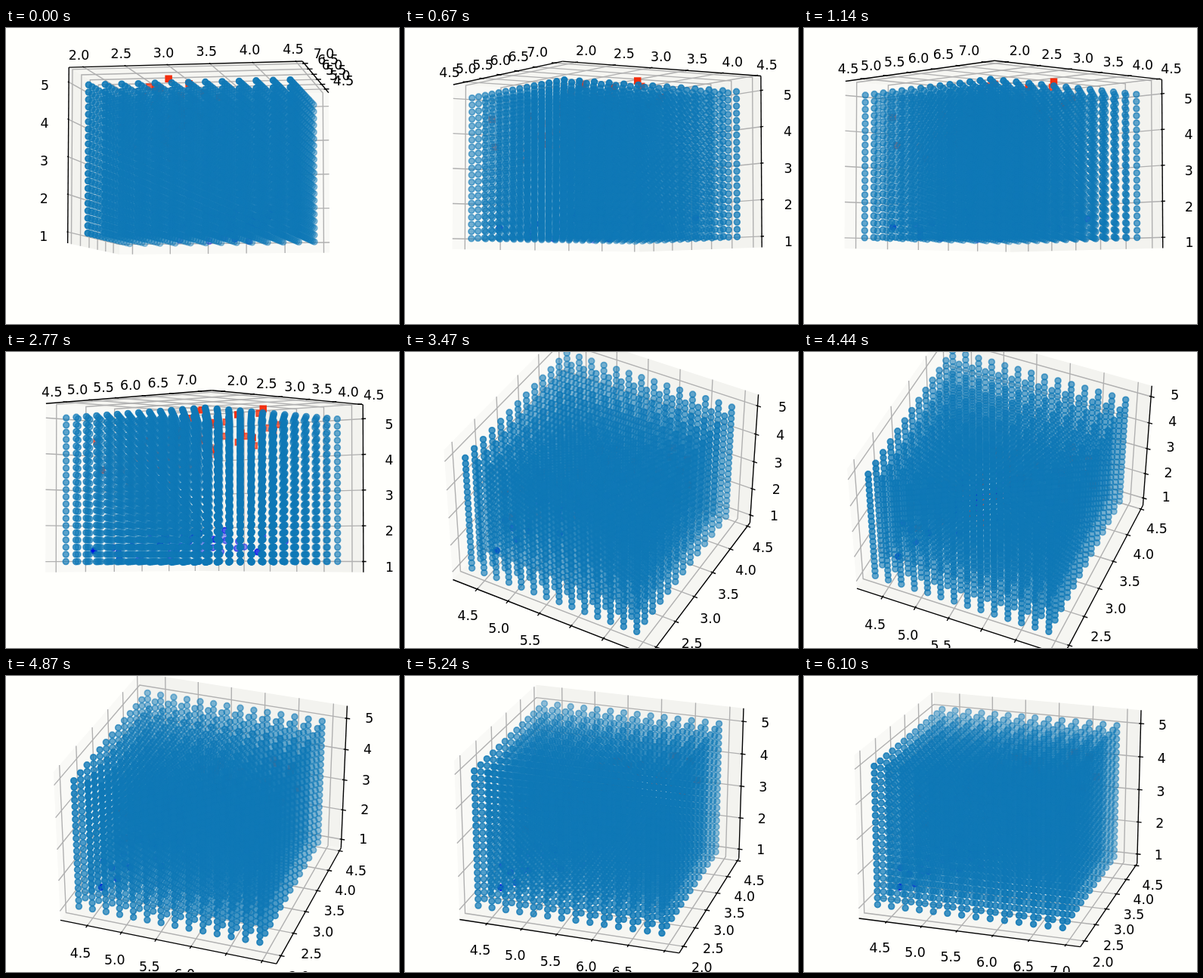
Recreate the animation shown at these times as an HTML page with a canvas. Size 520 px wide and 392 px high, loop 6.13 s.

```html
<!DOCTYPE html>
<html lang="en">
<head>
<meta charset="utf-8">
<title>Rotating 3D scatter</title>
<style>
html, body { margin: 0; width: 100%; height: 100%; overflow: hidden; background: #fffffc; }
canvas { display: block; }
</style>
</head>
<body>
<canvas id="stage" width="520" height="392"></canvas>
<script>
const ctx = document.getElementById('stage').getContext('2d');
const LOOP = 6130;

// View: screen centre, pixel scale, eye distance, box proportions
const CX = 263.3, CY = 180.2, SCALE = 2497, DIST = 10;
const BOX = [1.1429, 1.1429, 0.8571];
const EDGE = 0.5 + 1 / 48;
const LABEL = EDGE + 0.0864;
const PT = 125 / 72;
const PANES = ['#f9f9f6', '#f3f3ef', '#f6f6f2'];

const LIMITS = [[4.165, 7.135], [1.88, 4.52], [0.795, 5.305]];
const range = (a, step, n) => Array.from({ length: n }, (_, i) => a + i * step);
const TICKS = [range(4.5, 0.5, 6), range(2, 0.5, 6), range(1, 1, 5)];

const unit = (v, i) => (v - LIMITS[i][0]) / (LIMITS[i][1] - LIMITS[i][0]) - 0.5;
const toUnit = p => p.map(unit);

const lattice = [];
for (const x of range(4.3, 0.2, 14))
  for (const y of range(2, 0.2, 13))
    for (const z of range(1, 0.2, 21)) lattice.push(toUnit([x, y, z]));

let seed = 7;
function random() {
  seed = (seed * 16807) % 2147483647;
  return seed / 2147483647;
}
const noise = sd => (random() + random() + random() + random() - 2) * 1.73 * sd;
const inData = u => Math.max(-0.4545, Math.min(0.4545, u));

// Cloud around a mean; y and z follow x by the given slopes
function cloud([x, y, z], spread, slopeY, slopeZ) {
  return Array.from({ length: 48 }, () => {
    const dx = noise(spread[0]);
    const p = [x + dx, y + slopeY * dx + noise(spread[1]), z + slopeZ * dx + noise(spread[2])];
    return toUnit(p).map(inData);
  });
}
const dots = cloud([5, 3.43, 1.46], [0.35, 0.26, 0.17], 0.8, 0.13);
dots.push(toUnit([4.5, 2.3, 1.3]), toUnit([4.6, 3.6, 1]));
const squares = cloud([5.95, 2.8, 4.3], [0.5, 0.27, 0.3], 0.32, 0.69);
squares.push(toUnit([5, 2, 3.5]), toUnit([6, 2.7, 5.1]));

// Drag bursts: start, end, elevation and azimuth reached
const BURSTS = [
  [0, 0, -5.5, 10], [40, 100, -5.2, 8], [270, 670, -4, -31.1], [700, 870, -4, -37],
  [900, 1140, -4, -42.2], [2770, 2770, -2, -47.3], [2870, 2940, -1.2, -50],
  [3440, 3470, 40, -61], [3670, 3900, 55, -64], [4000, 4240, 50, -65.5],
  [4300, 4870, 30.5, -70.5], [4970, 5340, 20.5, -72.2], [6040, 6100, 20, -72.4]
];

function poseAt(t) {
  let pose = BURSTS[0].slice(2);
  for (const [a, b, ...goal] of BURSTS) {
    if (t < a) break;
    const gaps = Math.ceil((b - a) / 43);
    const step = t >= b ? gaps : Math.floor((t - a) / (b - a) * gaps);
    const f = (step + 1) / (gaps + 1);
    pose = pose.map((v, i) => v + (goal[i] - v) * f);
  }
  return pose;
}

function camera(elev, azim) {
  const e = elev * Math.PI / 180, a = azim * Math.PI / 180;
  const se = Math.sin(e), ce = Math.cos(e), sa = Math.sin(a), ca = Math.cos(a);
  const project = u => {
    const [x, y, z] = u.map((v, i) => v * BOX[i]);
    const out = x * ca + y * sa;
    const depth = DIST - out * ce - z * se;
    const k = SCALE / depth;
    return [CX + (y * ca - x * sa) * k, CY - (z * ce - out * se) * k, depth];
  };
  const far = [ca, sa, se].map(v => v > 0 ? -EDGE : EDGE);
  return { project, far };
}

function trace(points) {
  ctx.beginPath();
  for (const p of points) ctx.lineTo(p[0], p[1]);
}

const withAt = (p, i, v) => { const q = p.slice(); q[i] = v; return q; };

function drawPane(i, { project, far }) {
  const j = (i + 1) % 3, k = (i + 2) % 3;
  const flipJ = withAt(far, j, -far[j]);
  ctx.fillStyle = PANES[i];
  trace([far, flipJ, withAt(flipJ, k, -far[k]), withAt(far, k, -far[k])].map(project));
  ctx.fill();
}

function drawAxis(i, { project, far }) {
  const j = (i + 1) % 3, k = (i + 2) % 3;
  const side = i === 0 ? 1 : 0;
  const edge = withAt(far, side, -far[side]);
  const sign = Math.sign(edge[side]);
  ctx.lineWidth = 0.8 * PT;

  ctx.strokeStyle = '#b0b0b0';
  for (const v of TICKS[i]) {
    const p = withAt(far, i, unit(v, i));
    trace([withAt(p, j, -far[j]), p, withAt(p, k, -far[k])].map(project));
    ctx.stroke();
  }

  ctx.strokeStyle = ctx.fillStyle = '#000';
  trace([edge, withAt(edge, i, -edge[i])].map(project));
  ctx.stroke();
  for (const v of TICKS[i]) {
    const p = withAt(edge, i, unit(v, i));
    trace([0.2, -0.1].map(d => project(withAt(p, side, p[side] + sign * d / 12))));
    ctx.stroke();
    const at = project(p.map((c, n) => n === i ? c : Math.sign(c) * LABEL));
    ctx.fillText(i === 2 ? String(v) : v.toFixed(1), at[0], at[1] + 13.2);
  }
}

// Markers fade with depth; fill and outline overlap like separate layers
function drawMarkers(points, color, square, { project }) {
  const placed = points.map(project);
  const depths = placed.map(p => p[2]);
  const near = Math.min(...depths), away = Math.max(...depths);
  const r = Math.sqrt(20) * PT / 2;
  ctx.fillStyle = ctx.strokeStyle = color;
  ctx.lineWidth = PT;
  for (const [x, y, d] of placed) {
    ctx.globalAlpha = 1 - 0.7 * (d - near) / (away - near);
    ctx.beginPath();
    if (square) ctx.rect(x - r, y - r, 2 * r, 2 * r);
    else ctx.arc(x, y, r, 0, 2 * Math.PI);
    ctx.fill();
    ctx.stroke();
  }
  ctx.globalAlpha = 1;
}

function draw(pose) {
  const view = camera(...pose);
  ctx.fillStyle = '#fffffc';
  ctx.fillRect(0, 0, 520, 392);
  ctx.font = `${10 * PT}px "DejaVu Sans", sans-serif`;
  ctx.textAlign = 'center';
  for (let i = 0; i < 3; i++) drawPane(i, view);
  for (let i = 0; i < 3; i++) drawAxis(i, view);
  drawMarkers(squares, '#f42a08', true, view);
  drawMarkers(dots, '#0010e8', false, view);
  drawMarkers(lattice, '#0f78b6', false, view);
}

const start = performance.now();
let shown = '';
function frame() {
  const pose = poseAt((performance.now() - start) % LOOP);
  if (String(pose) !== shown) {
    shown = String(pose);
    draw(pose);
  }
  requestAnimationFrame(frame);
}
frame();
</script>
</body>
</html>
```
